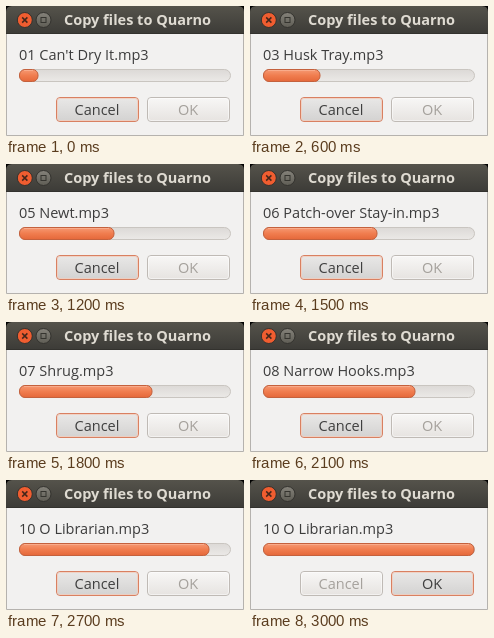
An HTML page for the animation above (3300 ms loop, 238 by 130 pixels).

```html
<!DOCTYPE html>
<html lang="en">
<head>
<meta charset="utf-8">
<title>Copy files</title>
<style>
html, body { margin: 0; width: 100%; height: 100%; overflow: hidden; background: #000; }
svg { display: block; width: 238px; height: 130px; }
text { font-family: "Open Sans", "Noto Sans", sans-serif; font-size: 14.5px; }
.title { font-weight: 700; fill: #dfdbd2; }
#file { fill: #3c3c3c; }
.btn rect { fill: url(#face); stroke: #bfbab5; }
.btn .glow { fill: none; stroke: #fff; stroke-opacity: .5; }
.btn text { fill: #a5a19c; text-anchor: middle; font-weight: 500; }
.btn.on rect { fill: url(#focus); stroke: #d98061; }
.btn.on .glow { fill: none; stroke: #f3cdbd; stroke-opacity: .8; }
.btn.on text { fill: #3f3f3f; }
</style>
</head>
<body>
<svg viewBox="0 0 238 130">
  <defs>
    <linearGradient id="bar" x2="0" y2="1">
      <stop offset="0" stop-color="#55534b"/><stop offset="1" stop-color="#3c3b37"/>
    </linearGradient>
    <linearGradient id="face" x2="0" y2="1">
      <stop offset="0" stop-color="#f8f7f6"/><stop offset="1" stop-color="#e6e3e0"/>
    </linearGradient>
    <linearGradient id="focus" x2="0" y2="1">
      <stop offset="0" stop-color="#e9e8e7"/><stop offset="1" stop-color="#d3d2d1"/>
    </linearGradient>
    <linearGradient id="groove" x2="0" y2="1">
      <stop offset="0" stop-color="#dcd9d6"/><stop offset="1" stop-color="#ebe9e7"/>
    </linearGradient>
    <linearGradient id="orange" x2="0" y2="1">
      <stop offset="0" stop-color="#f69a74"/><stop offset=".5" stop-color="#f07d4f"/><stop offset="1" stop-color="#e5683a"/>
    </linearGradient>
    <linearGradient id="grey" x2="0" y2="1">
      <stop offset="0" stop-color="#85827a"/><stop offset="1" stop-color="#5f5d55"/>
    </linearGradient>
  </defs>

  <rect y="20" width="238" height="110" fill="#f2f1f0"/>
  <path d="M.5 28V129.5H237.5V28" fill="none" stroke="#b5b2ae"/>
  <path d="M0 28V6Q0 0 6 0H232Q238 0 238 6V28Z" fill="url(#bar)"/>
  <path d="M0 27.5H238" stroke="#33322e"/>

  <g stroke="#33322e">
    <circle cx="18.8" cy="14" r="7.5" fill="#f05d30"/>
    <circle cx="37.5" cy="14" r="7.5" fill="url(#grey)"/>
  </g>
  <path d="M16.2 11.4l5.2 5.2m0-5.2l-5.2 5.2" stroke="#45261a" stroke-width="1.5"/>
  <rect x="35" y="11.5" width="5" height="5" fill="none" stroke="#35342f"/>
  <text class="title" x="58" y="19">Copy files to Quarno</text>

  <text id="file" x="13" y="53.5"></text>

  <rect x="13.5" y="63.5" width="211" height="12" rx="6" fill="url(#groove)" stroke="#c9c5c0"/>
  <rect id="fill" x="13.5" y="63.5" height="12" rx="5.5" fill="url(#orange)" stroke="#c4613d"/>
  <path id="shine" fill="none" stroke="#fbb598" stroke-opacity=".7"/>

  <g id="cancel" class="btn">
    <rect x="50.5" y="91.5" width="82" height="24" rx="3.5"/>
    <rect class="glow" x="51.5" y="92.5" width="80" height="22" rx="2.5"/>
    <text x="91" y="109">Cancel</text>
  </g>
  <g id="ok" class="btn">
    <rect x="141.5" y="91.5" width="82" height="24" rx="3.5"/>
    <rect class="glow" x="142.5" y="92.5" width="80" height="22" rx="2.5"/>
    <text x="182" y="109">OK</text>
  </g>
</svg>
<script>
const STEP = 300;
const tracks = [
  "Can't Dry It", "Candlewick", "Husk Tray", "Anchor in the Hay", "Newt",
  "Patch-over Stay-in", "Shrug", "Narrow Hooks", "Drizzly Noon", "O Librarian"
];
const last = tracks.length;
const el = id => document.getElementById(id);

function draw(ms) {
  const step = Math.floor(ms / STEP) % (last + 1);
  const done = step === last;
  const n = Math.min(step, last - 1);
  const right = done ? 224 : 32 + 19 * step;
  el("file").textContent = String(n + 1).padStart(2, "0") + " " + tracks[n] + ".mp3";
  el("fill").setAttribute("width", right - 13.5);
  el("shine").setAttribute("d", `M18 64.5H${right - 5}`);
  el("cancel").classList.toggle("on", !done);
  el("ok").classList.toggle("on", done);
}

function tick(now) {
  draw(now);
  requestAnimationFrame(tick);
}
draw(0);
requestAnimationFrame(tick);
</script>
</body>
</html>
```
